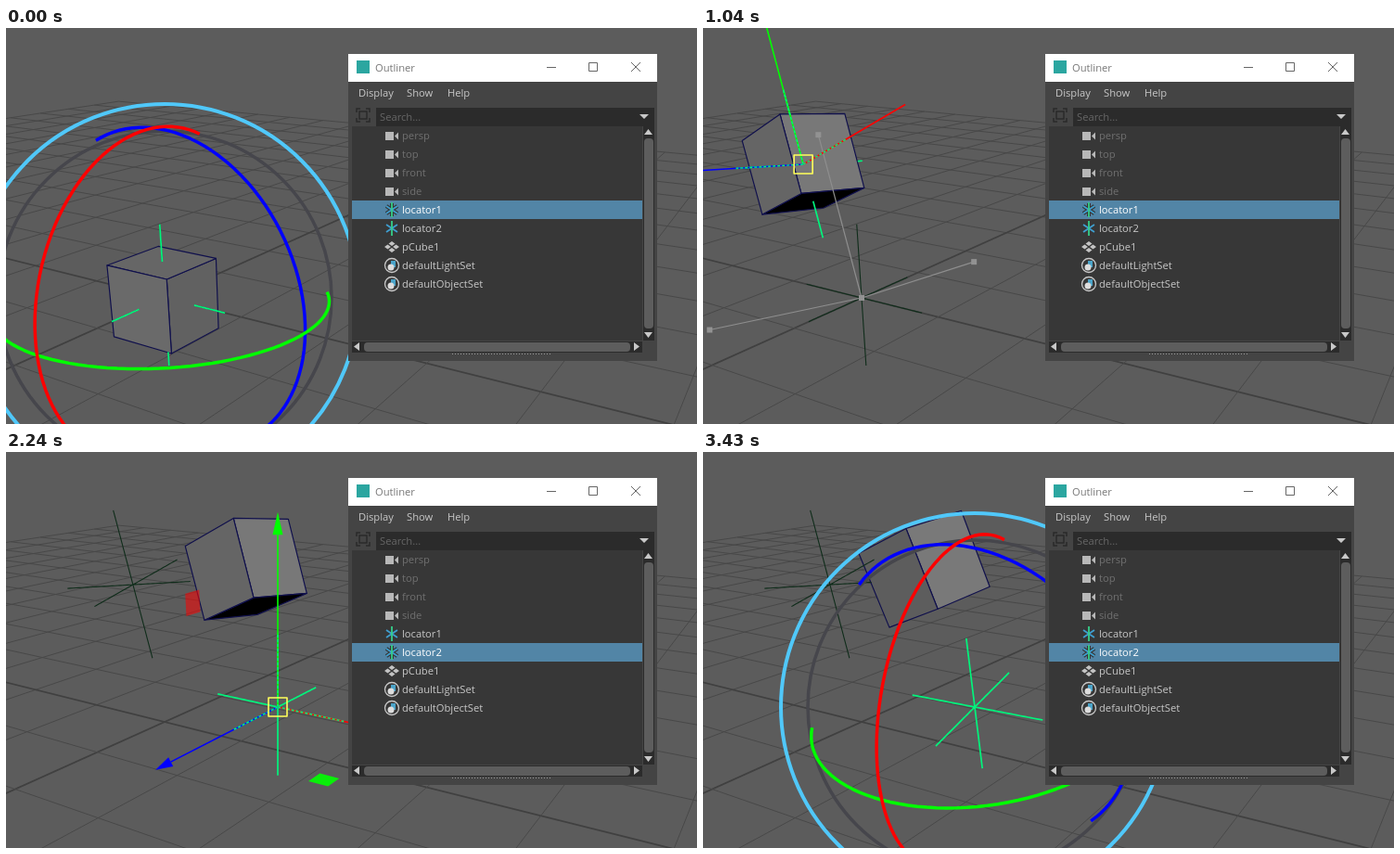
Animation, 745 px wide and 427 px high, one loop 3.49 s. Source, as an HTML page with a canvas:

```html
<!DOCTYPE html>
<html lang="en">
<head>
<meta charset="utf-8">
<title>Outliner and locators</title>
<style>
  html, body { margin: 0; width: 100%; height: 100%; overflow: hidden; background: #5c5c5c; }
  canvas, svg { position: absolute; left: 0; top: 0; }
  text { font: 11.2px "Open Sans", "Noto Sans", sans-serif; fill: #c8c8c8; }
</style>
</head>
<body>
<canvas id="view" width="745" height="427"></canvas>
<svg width="745" height="427">
  <path fill="#444" d="M369 28h333v331H369z"/>
  <path fill="#fff" d="M369 28h333v30H369z"/>
  <path fill="#2ba6a0" d="M378 35h14v14h-14z"/>
  <text x="398" y="47" style="fill:#777">Outliner</text>
  <path fill="none" stroke="#666" d="M583 42.5h10M628.5 37.5h9v9h-9zM674 37l10 10M684 37l-10 10"/>
  <text x="380" y="74">Display</text><text x="432" y="74">Show</text><text x="476" y="74">Help</text>
  <path fill="#2b2b2b" d="M399 86h300v20H399z"/>
  <path fill="#373737" d="M373 106h313v231H373z"/>
  <path fill="#2b2b2b" d="M687 106h12v231h-12zM373 338h313v12H373z"/>
  <path fill="none" stroke="#2a2a2a" stroke-width="1.5" d="M378 91v-4h4M388 87h4v4M392 97v4h-4M382 101h-4v-4M381 90h8v8h-8z"/>
  <text x="403" y="100" style="fill:#666">Search...</text>
  <g fill="#5d5d5d"><rect x="688" y="119" width="10" height="205" rx="4"/><rect x="386" y="339" width="287" height="10" rx="4"/></g>
  <path fill="#c8c8c8" d="M683 93h10l-5 5zM688 115h9l-4.500-6zM688 328h9l-4.500 6zM381 339v9l-6-4.500zM677 339v9l6-4.500z"/>
  <path stroke="#999" stroke-dasharray="1 2" d="M481 351.500h107"/>
  <rect id="highlight" x="373" width="313" height="20" fill="#5285a6"/>
  <g id="rows"></g>
</svg>
<script>
const LOOP = 3490, HANDLE = 2.2, RING = 2.19;
const RED = '#f00', GREEN = '#0f0', BLUE = '#00f', AXIS_COLORS = [RED, GREEN, BLUE];
const ctx = document.getElementById('view').getContext('2d');

// Outliner rows
const icons = {
  camera: '<path fill="#b8b8b8" d="M-7-4h9v9h-9zM3 .5l4-4v8z"/>',
  locator: '<path stroke="#373737" stroke-width="4" d="M-6-4L6 4M-6 4L6-4M0-7V7"/><path stroke="#3f9fd0" stroke-width="1.800" d="M-6-4L6 4M-6 4L6-4"/><path stroke="#35d08a" stroke-width="1.800" d="M0-8V8"/>',
  mesh: '<path fill="#c4c4c4" d="M0-6l3.500 2.500L0-1l-3.500-2.500zM-4.500-2.500L-1 0l-3.500 2.500L-8 0zM4.500-2.500L8 0 4.500 2.500 1 0zM0 1l3.500 2.500L0 6l-3.500-2.500z"/>',
  set: '<circle r="7.500" fill="none" stroke="#c8c8c8" stroke-width="1.300"/><path fill="#4aa3c8" d="M-1-5h5v7h-5z"/><circle cx="-1" cy="2" r="3.500" fill="#ddd"/>'
};
const items = [['persp', 'camera'], ['top', 'camera'], ['front', 'camera'], ['side', 'camera'],
  ['locator1', 'locator'], ['locator2', 'locator'], ['pCube1', 'mesh'],
  ['defaultLightSet', 'set'], ['defaultObjectSet', 'set']];
const rows = document.getElementById('rows'), highlight = document.getElementById('highlight');
rows.innerHTML = items.map(([name, icon], i) =>
  `<g transform="translate(416 ${116 + 20 * i})">${icons[icon]}<text x="11" y="4">${name}</text></g>`).join('');
const labels = [...rows.querySelectorAll('text')];

// Vectors and camera
const dot = (a, b) => a[0] * b[0] + a[1] * b[1] + a[2] * b[2];
const add = (a, b, s = 1) => a.map((v, i) => v + b[i] * s);
const scale = (a, s) => a.map(v => v * s);
const apply = (m, v) => [0, 1, 2].map(i => v[0] * m[0][i] + v[1] * m[1][i] + v[2] * m[2][i]);
const CENTER = [171, 291], ORIGIN = [0, 0, 0];
const SCREEN_X = [62.1, -5.04, -52.9], SCREEN_Y = [15.5, -76.1, 23.8], NEARNESS = [.0469, .0413, .0719];
const EYE = [6.65, 3.69, 7.457], LIGHT = [.5, .55, .6];

function project(p) {
  const depth = 1 - dot(p, NEARNESS);
  return [CENTER[0] + dot(p, SCREEN_X) / depth, CENTER[1] + dot(p, SCREEN_Y) / depth];
}

// World offset for a drag of (dx, dy) pixels in the view plane
function viewMove([dx, dy]) {
  const y = -dy / 89.8, x = (dx - 25.4 * y) / 96.6;
  return [x, y, -(.6523 * x + .5744 * y)];
}

// Axes of an XYZ Euler rotation in degrees
function rotation(angles) {
  const [a, b, c] = scale(angles, Math.PI / 180);
  const sx = Math.sin(a), cx = Math.cos(a), sy = Math.sin(b), cy = Math.cos(b), sz = Math.sin(c), cz = Math.cos(c);
  return [[cy * cz, cy * sz, -sy],
    [sx * sy * cz - cx * sz, sx * sy * sz + cx * cz, sx * cy],
    [cx * sy * cz + sx * sz, cx * sy * sz - sx * cz, cx * cy]];
}

// Motion: rows of [time, ...values]
const drag1 = [[420, 0, 0], [480, -2, -25], [540, -4, -62], [660, -20, -115], [840, -55, -140], [1040, -63, -144], [1160, -34, -148]];
const turn1 = [[40, 0, 0, 0], [180, -2, -2, 15], [320, -9.3, -7.5, 25.1]];
const drag2 = [[1590, 0, 0], [1640, 28, 0], [1820, 70, -7], [2120, 122, -16]];
const turn2 = [[2440, 0, 0, 0], [2660, 3, 14, -4], [2900, 2.2, 19.1, -14.4], [3160, 7, 11, -8], [3430, 12.4, 3.2, 0]];

function track(keys, t) {
  const i = keys.findIndex(k => k[0] > t);
  if (i === 0) return keys[0].slice(1);
  if (i < 0) return keys[keys.length - 1].slice(1);
  const [a, b] = [keys[i - 1], keys[i]], u = (t - a[0]) / (b[0] - a[0]);
  return a.slice(1).map((v, n) => v + (b[n + 1] - v) * u);
}

// Drawing helpers
function path(points) {
  ctx.beginPath();
  points.forEach(p => ctx.lineTo(...p));
}
function stroke(color, width) {
  ctx.strokeStyle = color;
  ctx.lineWidth = width;
  ctx.stroke();
}
function fill(points, color) {
  path(points);
  ctx.closePath();
  ctx.fillStyle = color;
  ctx.fill();
}
function line(a, b, color, width) {
  path([project(a), project(b)]);
  stroke(color, width);
}
function circle([x, y], r, color, width) {
  ctx.beginPath();
  ctx.arc(x, y, r, 0, 7);
  stroke(color, width);
}

function drawGrid() {
  const cells = 12, step = 1.25, n = cells * step;
  for (let i = -cells; i <= cells; i++) {
    const k = i * step, style = i ? ['#484848', 1] : ['#404040', 1.8];
    const endX = Math.min(n, (.9 - .0719 * k) / .0469), endZ = Math.min(n, (.9 - .0469 * k) / .0719);
    line([-n, 0, k], [endX, 0, k], ...style);
    line([k, 0, -n], [k, 0, endZ], ...style);
  }
}

function drawCube({ pos, axes }) {
  for (let i = 0; i < 3; i++) for (const side of [-.5, .5]) {
    const normal = scale(axes[i], side * 2), mid = add(pos, axes[i], side);
    if (dot(normal, add(EYE, mid, -1)) <= 0) continue;
    const u = axes[(i + 1) % 3], v = axes[(i + 2) % 3], light = dot(normal, LIGHT);
    const shade = light < 0 ? 0 : 52 + 90 * light;
    fill([[-.5, -.5], [.5, -.5], [.5, .5], [-.5, .5]].map(([a, b]) => project(add(add(mid, u, a), v, b))),
      `rgb(${shade},${shade},${shade})`);
    stroke('#10104c', 1.2);
  }
}

function hiddenBy({ pos, axes }, p) {
  const from = add(p, pos, -1), ray = add(EYE, p, -1);
  let near = 0, far = 1;
  for (const axis of axes) {
    const o = dot(axis, from), d = dot(axis, ray), a = (-.5 - o) / d, b = (.5 - o) / d;
    near = Math.max(near, Math.min(a, b));
    far = Math.min(far, Math.max(a, b));
  }
  return far > near + 1e-3;
}

function drawLocator(pos, axes, cube, selected) {
  const n = 24;
  ctx.beginPath();
  for (const axis of axes) for (let k = -n; k < n; k++) {
    if (hiddenBy(cube, add(pos, axis, (k + .5) / n))) continue;
    ctx.moveTo(...project(add(pos, axis, k / n)));
    ctx.lineTo(...project(add(pos, axis, (k + 1) / n)));
  }
  stroke(selected ? '#00f57c' : '#0f2c1a', selected ? 1.7 : 1.1);
}

// Each colored ring shows only the half that faces the eye
function drawRings(pos, axes) {
  const mid = project(pos), toEye = add(EYE, pos, -1), n = 120;
  circle(mid, 180, '#46464c', 3.5);
  circle(mid, 209, '#50c8fa', 4);
  for (const i of [2, 1, 0]) {
    const u = axes[(i + 1) % 3], v = axes[(i + 2) % 3];
    let drawing = false;
    ctx.beginPath();
    for (let k = 0; k <= n; k++) {
      const angle = k / n * 2 * Math.PI;
      const offset = add(scale(u, RING * Math.cos(angle)), v, RING * Math.sin(angle));
      const visible = dot(offset, toEye) > 0;
      if (visible) ctx[drawing ? 'lineTo' : 'moveTo'](...project(add(pos, offset)));
      drawing = visible;
    }
    stroke(AXIS_COLORS[i], 3.5);
  }
}

function drawGhost(axes) {
  for (const axis of axes) {
    const tip = scale(axis, HANDLE), [x, y] = project(tip);
    line(ORIGIN, tip, '#8e8e8e', 1.2);
    ctx.fillStyle = '#929292';
    ctx.fillRect(x - 3, y - 3, 6, 6);
  }
  ctx.fillRect(CENTER[0] - 3, CENTER[1] - 3, 6, 6);
}

function drawHeads(pos, axes) {
  axes.forEach((axis, i) => {
    const u = axes[(i + 1) % 3], v = axes[(i + 2) % 3];
    const base = project(add(pos, axis, HANDLE)), tip = project(add(pos, axis, 2.46));
    const dx = tip[0] - base[0], dy = tip[1] - base[1], s = 5.5 / Math.hypot(dx, dy);
    fill([tip, [base[0] - dy * s, base[1] + dx * s], [base[0] + dy * s, base[1] - dx * s]], AXIS_COLORS[i]);
    ctx.globalAlpha = i === 1 ? .9 : .55;
    fill([[1.56, 1.56], [1.8, 1.56], [1.8, 1.8], [1.56, 1.8]].map(([a, b]) => project(add(add(pos, u, a), v, b))), AXIS_COLORS[i]);
    ctx.globalAlpha = 1;
  });
}

function drawMover(pos, axes, dragging) {
  if (dragging) drawGhost(axes);
  axes.forEach((axis, i) => {
    line(pos, add(pos, axis, HANDLE), AXIS_COLORS[i], 1.6);
    ctx.setLineDash([3, 2]);
    line(pos, add(pos, axis), '#00f57c', 1.4);
    ctx.setLineDash([]);
  });
  if (!dragging) drawHeads(pos, axes);
  const [x, y] = project(pos);
  ctx.strokeStyle = '#ffff5a';
  ctx.lineWidth = 1.6;
  ctx.strokeRect(x - 10, y - 10, 20, 20);
}

function draw(t) {
  const first = t < 1280, rotating = t < 340 || t >= 2360;
  const dragging = t >= 420 && t < 1160 || t >= 1590 && t < 2180;
  const pos1 = viewMove(track(drag1, t)), axes1 = rotation(track(turn1, t));
  const pos2 = viewMove(track(drag2, t)), axes2 = rotation(track(turn2, t));
  const cube = { pos: add(pos2, apply(axes2, pos1)), axes: axes1.map(a => apply(axes2, a)) };
  const [pos, axes] = first ? [pos1, axes1] : [pos2, axes2];

  ctx.fillStyle = '#5c5c5c';
  ctx.fillRect(0, 0, 745, 427);
  drawGrid();
  drawCube(cube);
  if (first) drawLocator(pos2, axes2, cube, false);
  else drawLocator(pos1, axes1, cube, false);
  drawLocator(pos, axes, cube, true);
  if (rotating) drawRings(pos, axes);
  else drawMover(pos, axes, dragging);

  const selected = first ? 4 : 5;
  highlight.setAttribute('y', 106 + 20 * selected);
  labels.forEach((label, i) => label.style.fill = i < 4 ? '#707070' : i === selected ? '#fff' : '#c8c8c8');
}

ctx.lineJoin = 'round';
const start = performance.now();
function tick() {
  draw((performance.now() - start) % LOOP);
  requestAnimationFrame(tick);
}
tick();
</script>
</body>
</html>
```
